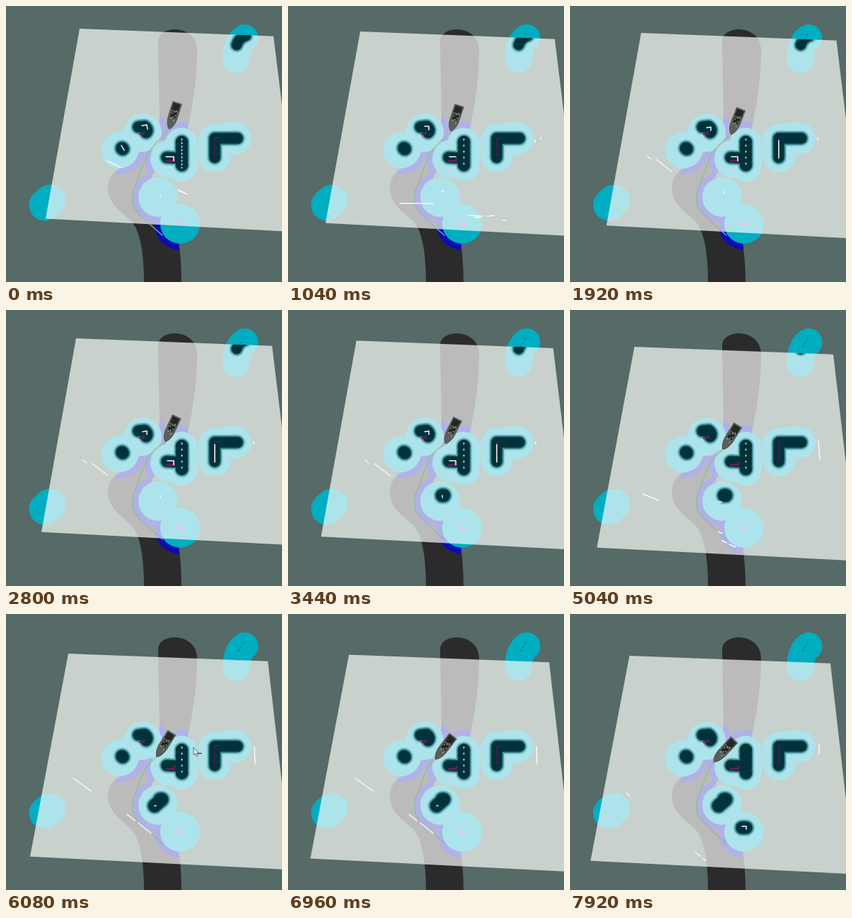
An HTML page with a canvas for the animation above (8000 ms loop, 390 px wide and 390 px high).

```html
<!DOCTYPE html>
<html lang="en">
<head>
<meta charset="utf-8">
<title>Navigation map</title>
<style>
html, body { margin: 0; width: 100%; height: 100%; overflow: hidden; background: #566a67; }
canvas { display: block; width: 390px; height: 390px; }
</style>
</head>
<body>
<canvas id="map" width="390" height="390"></canvas>
<script>
const ctx = document.getElementById('map').getContext('2d');
const LOOP = 8000, STEP = 80;

// time, window top-left, top-right x, bottom-left, boat bow, boat stern
const poses = [
  [0, 104, 32, 378, 56, 300.5, 230.5, 174, 242, 137],
  [1040, 102, 36, 377, 53, 306.7, 230, 177, 242, 141],
  [2800, 99, 40, 376, 50, 313.7, 225, 186, 241, 151],
  [4160, 94, 47, 373.5, 43, 327.7, 219.5, 192, 238, 158],
  [5040, 91, 52, 372, 38, 335.7, 216, 197, 237, 163],
  [6080, 88, 56, 370, 34, 342.7, 213, 202, 234, 168],
  [7920, 84, 59, 368, 29, 348.7, 203, 209, 232, 178]
];

const road = new Path2D(`M215 50 C215 26 270 25 270 63 C270 105 263 145 257 172
  C250 205 214 220 206 240 C200 268 238 298 244 335 Q248 360 248 390
  L195 390 C195 350 190 320 178 305 C165 292 145 282 144 258
  C144 238 157 232 176 217 C203 197 217 185 217 155 Z`);

// obstacle centre line and inflation radius
const zones = [
  ['M193 179h.1', 27], ['M160 204L162 203', 25.5], ['M231 216h.1', 27],
  ['M248 195V225', 23], ['M295 212V190L324 187', 23], ['M215 270h.1', 28],
  ['M246 308h.1', 28], ['M55 281L62 275', 22.5], ['M337 45.5Q326 53 325.5 75', 19.5]
].map(([d, r]) => [new Path2D(d), r]);

// obstacle line, width, time it is first seen
const cores = [
  ['M187 171L196 170Q202 175 198 179', 13, 0],
  ['M164 201l1 1', 15, 0],
  ['M227 214L244 215', 13, 0],
  ['M248.5 192V225', 14, 0],
  ['M295 214V187H327', 13, 0],
  ['M339 42Q329 45 326 55', 12, 0],
  ['M218 262h2', 16, 3360],
  ['M210 271L219 263', 16, 5520],
  ['M243 302h6', 15, 7040]
].map(([d, w, at]) => [new Path2D(d), w, at]);

// laser returns: start time and strokes
const scans = [
  [0, 'M143 219L162 228M243 260L256 266M192 169L199 168L200 174M163 197L167 204M226 213H237V219M218 268v2'],
  [560, 'M158 279H205M254 296L275 297M282 297L291 296M303 303h5M217 262h3M349 189v4M357 186v2M193 170L199 170L199 175M228 213H237M264 299h8'],
  [1920, 'M109 212L114 216M122 217L144 234M295 190V215M350 186v3M193 172L199 171V176M228 213H237V219M218 262v3'],
  [3520, 'M110 272L129 279M295 186V193M295 199V217M350 186v3M194 171L199 174M219 319L227 320M217 262h4'],
  [4640, 'M103 260L125 269M351 185L353 211M209 313L215 316M215 326L221 329M225 331L234 335M209 271h5'],
  [5520, 'M95 232L120 250M171 283L182 292M187 295L205 310M351 187L352 212M210 271h2'],
  [7040, 'M80 253L84 257M352 185V198M177 337L184 342M188 346L192 348M243 300H249V304']
].map(([at, d]) => [at, new Path2D(d)]);

const boat = new Path2D('M-19 -6.5L4 -6.5Q15 -5.5 19 0Q15 5.5 4 6.5L-19 6.5Z');
const trail = [[224, 181], [206, 200], [197, 214], [190, 236], [179, 262], [178, 281], [190, 297], [221, 324]];
const pinkMarks = new Path2D('M241 305l6 5M246 307l5 3M215 268h5');
const hotMarks = new Path2D('M189 181h5l1 -3M227 219H238V215');
const thinMark = new Path2D('M295 213V186H303');
const dashes = new Path2D('M336 40L327 55');
const cursor = new Path2D('M265 189V199L267.5 197L269 201L271 200L269.5 196.5H272Z');

function poseAt(t) {
  let i = 0;
  while (i < poses.length - 2 && t >= poses[i + 1][0]) i++;
  const a = poses[i], b = poses[i + 1], k = (t - a[0]) / (b[0] - a[0]);
  return a.map((v, j) => v + (b[j] - v) * k);
}

function line(path, color, width, dash = []) {
  ctx.setLineDash(dash);
  ctx.strokeStyle = color;
  ctx.lineWidth = width;
  ctx.stroke(path);
  ctx.setLineDash([]);
}

function fill(path, color) {
  ctx.fillStyle = color;
  ctx.fill(path);
}

function drawGround(quad) {
  ctx.fillStyle = '#566a67';
  ctx.fillRect(0, 0, 390, 390);
  fill(quad, '#536f60');
  fill(road, '#2b2b2b');
  ctx.save();
  ctx.clip(road);
  for (const [p, r] of zones) line(p, '#0c0cb4', r * 2 + 17);
  ctx.restore();
  for (const [p, r] of zones) line(p, '#00adc1', r * 2);
  line(pinkMarks, '#f020f0', 1.8);
  line(dashes, '#0870a0', 1.2, [2, 4]);
}

function drawWindow(quad, t) {
  fill(quad, 'rgba(255,255,255,.68)');
  ctx.save();
  ctx.clip(quad);
  const seen = cores.filter(c => t >= c[2]);
  for (const [grow, color] of [[10, '#8fcfd5'], [7, '#569fa6'], [4, '#1c636b'], [1.5, '#00323a']])
    for (const [d, w] of seen) line(d, color, w + grow);
  line(cores[3][0], '#00323a', 17, [.1, 8]);
  line(hotMarks, '#7a1656', 2.4);
  line(thinMark, '#6c1048', 1.2);
  ctx.restore();
}

function drawTrail(x, y) {
  const pts = [[x, y], ...trail.filter(q => q[1] > y + 4)];
  ctx.beginPath();
  ctx.moveTo(x, y);
  for (let i = 1; i < pts.length - 1; i++) {
    const [ax, ay] = pts[i], [nx, ny] = pts[i + 1];
    ctx.quadraticCurveTo(ax, ay, (ax + nx) / 2, (ay + ny) / 2);
  }
  ctx.lineTo(221, 324);
  ctx.strokeStyle = '#86c08a';
  ctx.lineWidth = 1.2;
  ctx.stroke();
  if (y < 199) line(new Path2D(`M${x} ${y}L205 202`), '#c9b18f', 1);
}

function drawBoat(x, y, sx, sy) {
  ctx.save();
  ctx.translate((x + sx) / 2, (y + sy) / 2);
  ctx.rotate(Math.atan2(y - sy, x - sx));
  ctx.scale(Math.hypot(x - sx, y - sy) / 38, 1);
  fill(boat, '#5a5f59');
  line(boat, '#4a5148', .8);
  ctx.fillStyle = '#232622';
  ctx.fillRect(-18, -5, 10, 10);
  ctx.fillRect(-6, -4, 8, 8);
  ctx.fillStyle = '#b4b8b0';
  for (let i = 0; i < 7; i++) ctx.fillRect(-9 + i * 2.4, i % 3 * 2.6 - 3.4, 1.4, 1.4);
  ctx.restore();
}

function draw(t) {
  const p = poseAt(t);
  const [, lx, ly, rx, bx, by] = p;
  const quad = new Path2D(`M${lx} ${ly}L${rx} ${ly + 10.7}L${rx + 34} ${by + 18.8}L${bx} ${by}Z`);
  ctx.lineCap = ctx.lineJoin = 'round';
  drawGround(quad);
  drawWindow(quad, t);
  drawTrail(p[6], p[7]);
  drawBoat(...p.slice(6));
  const scan = scans.filter(s => t >= s[0]).pop();
  line(scan[1], '#f7fbf8', 1.5);
  if (t < 7040) line(new Path2D('M248.5 188V229'), '#dce9e6', 1.6, t < 560 ? [1.5, 3.5] : [1.5, 7]);
  if (t >= 5600 && t < 6480) {
    fill(cursor, '#f4f6f5');
    line(cursor, '#38494a', .8);
    line(new Path2D('M272 197h4'), '#38494a', 1.5);
  }
}

function tick() {
  draw(Math.floor(performance.now() % LOOP / STEP) * STEP);
  requestAnimationFrame(tick);
}
tick();
</script>
</body>
</html>
```
